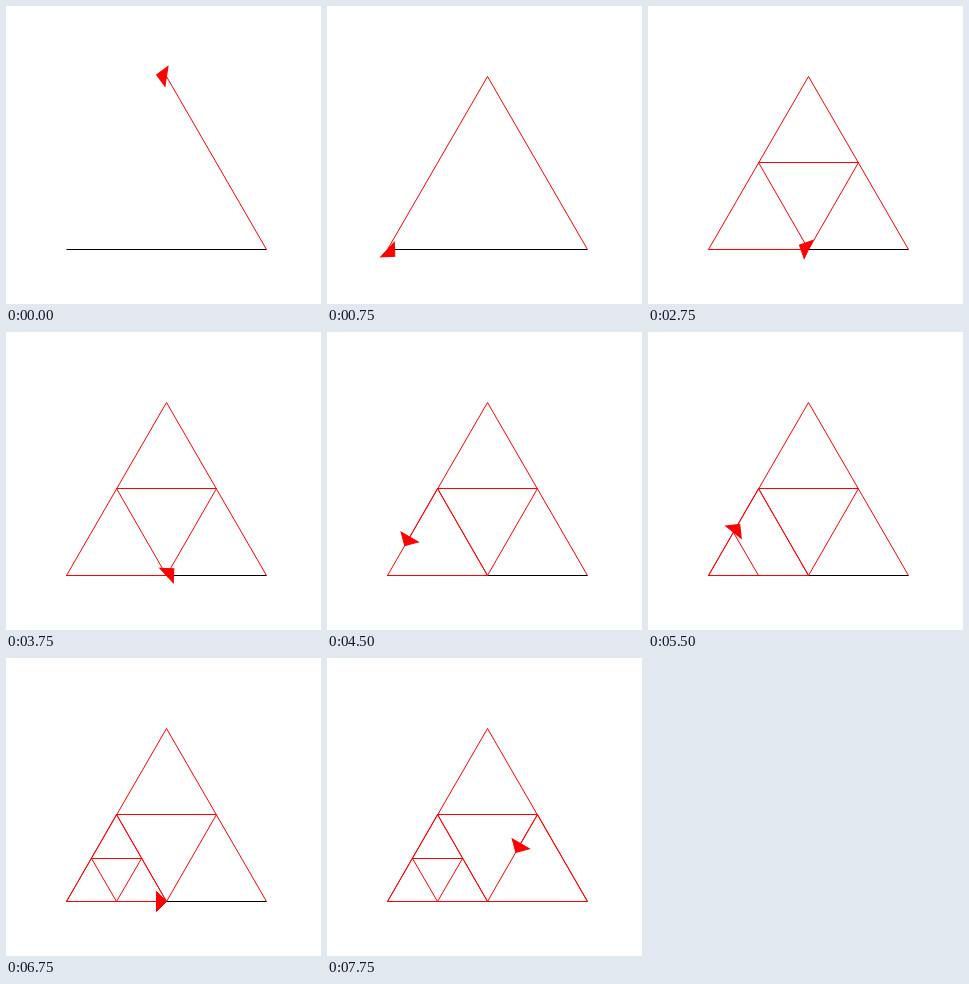
An HTML page with a canvas that plays this animation: 315 px wide and 298 px high, repeating every 8000 ms.

```html
<!DOCTYPE html>
<html lang="en">
<head>
<meta charset="utf-8">
<title>Turtle triangles</title>
<style>
  html, body { margin: 0; width: 100%; height: 100%; overflow: hidden; background: #fff; }
  canvas { display: block; }
</style>
</head>
<body>
<canvas id="stage" width="315" height="298"></canvas>
<script>
const ctx = document.getElementById('stage').getContext('2d');
const TICK = 250, LOOP = 8000;
const RAD = Math.PI / 180;

// Turtle program: F/B move, L/R turn by 120 degrees
const inner = n => `F${n} L F${n} R F${n} R F${n} R R B${n}`;
const outer = n => `F${n} L F${n} L F${n} L`;
const program = [outer(200), inner(100), outer(100), inner(50), 'F50 F50', outer(100)]
  .join(' ').split(' ');

// Hops per move or turn, as a turtle at normal speed makes them
const moveHops = n => 1 + Math.floor(n / 12);
const TURN_HOPS = 14;

function compile() {
  let x = 60, y = 243, heading = 0, at = 0;
  return program.map(word => {
    const op = word[0], n = Number(word.slice(1));
    const step = { x, y, heading, at, dx: 0, dy: 0, turn: 0 };
    if (op === 'L' || op === 'R') {
      step.turn = op === 'L' ? 120 : -120;
      step.hops = TURN_HOPS;
    } else {
      const d = op === 'B' ? -n : n;
      step.dx = d * Math.cos(heading * RAD);
      step.dy = -d * Math.sin(heading * RAD);
      step.hops = moveHops(n);
      step.line = true;
    }
    x += step.dx;
    y += step.dy;
    heading += step.turn;
    at += step.hops;
    return step;
  });
}

const steps = compile();
steps[0].color = '#000';
const FIRST = steps[3].at;   // the loop opens in the second turn

// Pace: [tick, hops done]
const pace = [[0, 6], [5, 63], [7, 86], [10, 122], [11, 133], [13, 156], [14, 162],
  [15, 174], [22, 261], [26, 323], [27, 333], [30, 372], [31, 383]];

function hopsAt(tick) {
  const i = Math.max(1, pace.findIndex(p => p[0] >= tick));
  const [t0, h0] = pace[i - 1], [t1, h1] = pace[i];
  return FIRST + Math.round(h0 + (h1 - h0) * (tick - t0) / (t1 - t0));
}

const snap = v => Math.round(v) + 0.5;

function drawLine(s, part) {
  ctx.strokeStyle = s.color || '#f00';
  ctx.beginPath();
  ctx.moveTo(snap(s.x), snap(s.y));
  ctx.lineTo(snap(s.x + s.dx * part), snap(s.y + s.dy * part));
  ctx.stroke();
}

function drawArrow(x, y, heading) {
  ctx.save();
  ctx.translate(x + 0.5, y + 0.5);
  ctx.rotate(-heading * RAD);
  ctx.fillStyle = ctx.strokeStyle = '#f00';
  ctx.beginPath();
  ctx.moveTo(0, -10);
  ctx.lineTo(10, 0);
  ctx.lineTo(0, 10);
  ctx.closePath();
  ctx.fill();
  ctx.stroke();
  ctx.restore();
}

// Tip of the mouse pointer at the top edge
function drawPointer() {
  ctx.fillStyle = '#bbb';
  ctx.fillRect(270, 0, 5, 1);
  ctx.fillRect(272, 1, 1, 1);
}

function draw(tick) {
  const hops = hopsAt(tick);
  ctx.fillStyle = '#fff';
  ctx.fillRect(0, 0, 315, 298);
  ctx.lineWidth = 1;
  let last, part;
  for (const s of steps) {
    if (s.at >= hops) break;
    last = s;
    part = Math.min(1, (hops - s.at) / s.hops);
    if (s.line) drawLine(s, part);
  }
  if (tick >= 4 && tick < 10) drawPointer();
  drawArrow(last.x + last.dx * part, last.y + last.dy * part, last.heading + last.turn * part);
}

const start = performance.now();
function frame() {
  const t = (performance.now() - start) % LOOP;
  draw(Math.floor(t / TICK));
  requestAnimationFrame(frame);
}
frame();
</script>
</body>
</html>
```
